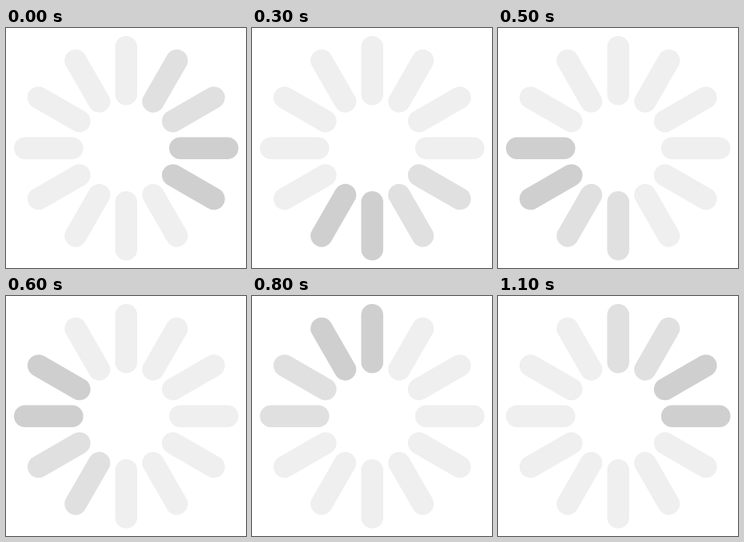
Animation, 300 px wide and 300 px high, one loop 1200 ms. Source, as an HTML page with a canvas:

```html
<!DOCTYPE html>
<html lang="en">
<head>
<meta charset="utf-8">
<title>Loading spinner</title>
<style>
  html, body { margin: 0; width: 100%; height: 100%; overflow: hidden; background: #fff; }
  canvas { display: block; width: 300px; height: 300px; }
</style>
</head>
<body>
<canvas id="stage" width="300" height="300"></canvas>
<script>
  const ctx = document.getElementById('stage').getContext('2d');
  const SPOKES = 12, STEP = 100, FIRST = 4;
  const CENTER = 150.25, INNER = 53.7, OUTER = 140.3, WIDTH = 27.6;
  const TAIL = ['#cfcfcf', '#cfcfcf', '#e0e0e0', '#e0e0e0'];
  const IDLE = '#efefef';

  function drawSpoke(index, color) {
    const angle = index / SPOKES * Math.PI * 2 - Math.PI / 2;
    const at = r => [CENTER + Math.cos(angle) * r, CENTER + Math.sin(angle) * r];
    ctx.strokeStyle = color;
    ctx.beginPath();
    ctx.moveTo(...at(INNER + WIDTH / 2));
    ctx.lineTo(...at(OUTER - WIDTH / 2));
    ctx.stroke();
  }

  function draw(time) {
    const head = (FIRST + Math.floor(time / STEP)) % SPOKES;
    ctx.fillStyle = '#fff';
    ctx.fillRect(0, 0, 300, 300);
    ctx.lineWidth = WIDTH;
    ctx.lineCap = 'round';
    for (let i = 0; i < SPOKES; i++) {
      const age = (head - i + SPOKES) % SPOKES;
      drawSpoke(i, TAIL[age] || IDLE);
    }
  }

  const start = performance.now();
  function tick() {
    draw(performance.now() - start);
    requestAnimationFrame(tick);
  }
  tick();
</script>
</body>
</html>
```
